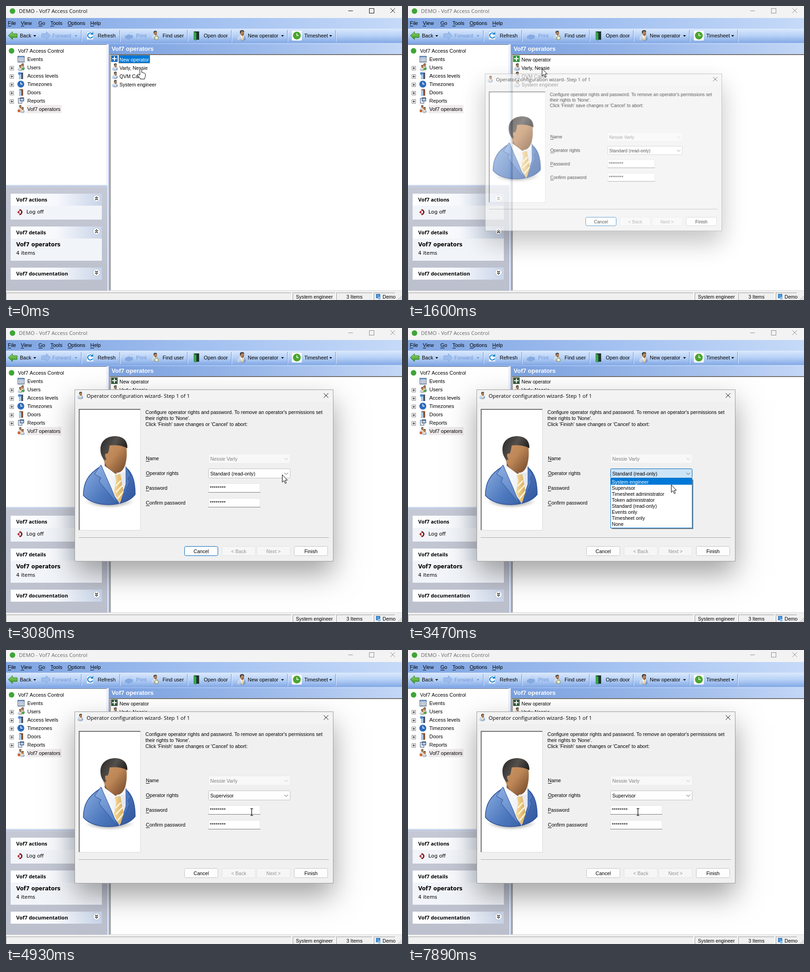
An HTML page with a canvas for the animation above (8 s loop, 855 px wide and 636 px high).

```html
<!DOCTYPE html>
<html lang="en">
<head>
<meta charset="utf-8">
<title>Operator rights</title>
<style>
html, body { margin: 0; width: 100%; height: 100%; overflow: hidden; }
canvas { display: block; }
</style>
</head>
<body>
<canvas id="stage" width="855" height="636"></canvas>
<script>
const LOOP = 8000, STEP = 1000 / 15;
const screen2d = document.getElementById('stage').getContext('2d');
const layer = Object.assign(document.createElement('canvas'), { width: 855, height: 636 });
const layer2d = layer.getContext('2d');
let g = screen2d;

const SANS = '"Liberation Sans", Arial, sans-serif';
const UI = '11px ' + SANS, SMALL = '10.6px ' + SANS, HEAD = 'bold 13px ' + SANS;
const TITLE = '11.4px "Open Sans", sans-serif', CARD = 'bold 11px "Open Sans", sans-serif';
const WIDE = '11px "DejaVu Sans", sans-serif', WIDE_BOLD = 'bold 11.4px "DejaVu Sans", sans-serif';

const PRODUCT = 'Vof7';
const RIGHTS = ['System engineer', 'Supervisor', 'Timesheet administrator', 'Token administrator',
  'Standard (read-only)', 'Events only', 'Timesheet only', 'None'];

// drawing helpers
const rect = (x, y, w, h, c) => { g.fillStyle = c; g.fillRect(x, y, w, h); };
const frame = (x, y, w, h, c) => { g.strokeStyle = c; g.lineWidth = 1; g.strokeRect(x + .5, y + .5, w - 1, h - 1); };
function path(d, fill, stroke, width = 1) {
  const p = new Path2D(d);
  if (fill) { g.fillStyle = fill; g.fill(p); }
  if (stroke) { g.strokeStyle = stroke; g.lineWidth = width; g.stroke(p); }
}
function disc(x, y, r, fill, stroke, width = 1) {
  g.beginPath(); g.arc(x, y, r, 0, 7);
  if (fill) { g.fillStyle = fill; g.fill(); }
  if (stroke) { g.strokeStyle = stroke; g.lineWidth = width; g.stroke(); }
}
function box(x, y, w, h, r, fill, stroke) {
  g.beginPath(); g.roundRect(x + .5, y + .5, w - 1, h - 1, r);
  g.fillStyle = fill; g.fill();
  g.strokeStyle = stroke; g.lineWidth = 1; g.stroke();
}
function at(x, y, scale, draw) {
  g.save(); g.translate(x, y); g.scale(scale, scale); draw(); g.restore();
}
function grad(x0, y0, x1, y1, ...colors) {
  const q = g.createLinearGradient(x0, y0, x1, y1);
  colors.forEach((c, i) => q.addColorStop(i / (colors.length - 1), c));
  return q;
}
function text(s, x, y, font = UI, color = '#000', align = 'left') {
  g.font = font; g.fillStyle = color; g.textAlign = align; g.fillText(s, x, y);
}
function mnemonic(s, x, y, font) {
  text(s, x, y, font);
  rect(x, y + 2, Math.round(g.measureText(s[0]).width), 1, '#000');
}
const clamp = v => Math.max(0, Math.min(1, v));
const ramp = (t, a, b) => clamp((t - a) / (b - a));
const mix = (a, b, k) => `rgb(${a.map((v, i) => Math.round(v + (b[i] - v) * k))})`;

// 112 x 150 bust without facial features; suit is [light, middle, dark]
function avatar([light, middle, dark]) {
  path('M0 128C0 100 10 82 38 65L84 62C104 74 112 92 112 126C92 154 22 156 0 128Z',
    grad(0, 60, 112, 150, light, middle, dark), dark, 1.5);
  path('M38 58L92 60L97 88L78 144L58 118Z', grad(38, 0, 97, 0, '#ffffff', '#dfe4ee'));
  path('M68 84L80 82L82 94L88 128L78 146L66 122L71 96Z', grad(66, 0, 88, 0, '#f8dc9c', '#d3a758'));
  path('M70 108L81 96M70 122L85 106M74 135L87 119', null, '#fff4d4', 3);
  path('M38 62L24 82L38 90L34 98L74 147L60 112Z', grad(24, 60, 74, 147, light, middle), dark);
  path('M92 66L102 84L96 92L100 98L80 146L92 104Z', middle, dark);
  path('M46 46L40 64L64 88L72 80L90 78L86 56Z', '#f7f9fc');
  path('M46 46L46 64L70 82L84 66Z', '#8a5a36');
  path('M44 24C48 6 88 6 93 24C96 50 90 78 74 79C58 78 46 62 42 46Z',
    grad(44, 20, 94, 60, '#c99464', '#bd8656', '#835634'));
  path('M37 30C36 8 54 0 68 0C86 0 96 10 95 26C82 19 68 19 57 20C55 30 55 38 50 38C46 36 46 44 50 50L46 52C40 46 37 38 37 30Z',
    grad(40, 0, 95, 30, '#2a2927', '#55504c', '#1b1917'));
}
const BLUE_SUIT = ['#8fb0e2', '#4f7abf', '#2d5299'];
const PALE_SUIT = ['#f0f4fa', '#b4c6e2', '#5b7cb4'];
const person = (x, y, h) => at(x - h * .373, y - h / 2, h / 150, () => avatar(PALE_SUIT));

function bigArrow(x, fill, edge, flip) {
  g.save(); g.translate(x, 64); if (flip) g.scale(-1, 1);
  path('M-10 0L-1 -8.5V-4H9V4H-1V8.5Z', fill, edge);
  g.restore();
}
const dropMark = (x, c = '#000') => path(`M${x - 3} 63h6l-3 3.5Z`, c);
const chevron = (x, y, c) => path(`M${x - 4} ${y - 2}l4 4l4 -4`, null, c);
const cross = (x, y, c) => path(`M${x - 5} ${y - 5}l10 10m0 -10l-10 10`, null, c);
function clock(x, y, r, face) {
  disc(x, y, r, face);
  path(`M${x} ${y - r * .6}V${y}H${x + r * .5}`, null, '#fff', 1.5);
}
function door(x, y, c) {
  rect(x - 4, y - 7, 9, 14, c);
  path(`M${x - 4} ${y - 7}l5 3v12l-5 -2Z`, '#a8c8e8');
}

function titleBar(active) {
  rect(0, 0, 855, 26, '#f3f3f3');
  const c = active ? '#111' : '#8c8c8c';
  disc(14, 11, 6, '#3fa535');
  text(`DEMO - ${PRODUCT} Access Control`, 28, 15, TITLE, active ? '#111' : '#666');
  rect(739, 10, 10, 1, c);
  frame(784, 5, 11, 11, c);
  cross(835, 10, c);
}

function toolbars() {
  rect(0, 26, 855, 57, grad(0, 0, 855, 0, '#7ea4e2', '#a2c0f0', '#c6daf8'));
  [['File', 4], ['View', 32], ['Go', 70], ['Tools', 96], ['Options', 133], ['Help', 182]]
    .forEach(([s, x]) => mnemonic(s, x, 41));
  rect(0, 49, 855, 31, grad(0, 49, 0, 80, '#dbe9fd', '#b6d0f6', '#82a8e5'));
  [162, 245, 391, 486, 607, 711].forEach(x => { rect(x, 52, 1, 25, '#6a8ccb'); rect(x + 1, 53, 1, 25, '#f1f6ff'); });
  bigArrow(15, grad(0, -8, 0, 8, '#9bd96b', '#2f9423'), '#2b7b22');
  bigArrow(86, '#9dbdec', '#83a8df', true);
  rect(174, 55, 15, 18, '#fafcff'); frame(174, 55, 15, 18, '#b3c6e4');
  path('M186 60A5.5 5.5 0 1 0 187 66', null, '#1683d2', 2.2);
  path('M188 56v6h-6Z', '#1683d2');
  path('M257 65l10 -5l7 4v5l-9 4l-8 -3Z', '#86a9e0');
  path('M263 61l4 -6l7 1l-3 7Z', '#c1d5f4');
  person(321, 63, 19); disc(325, 69, 4, '#e9edc9', '#7f8640');
  rect(405, 55, 12, 18, '#223333'); path('M405 55l6 3v17l-6 -2Z', '#35a44b');
  person(508, 64, 24);
  box(617, 53, 22, 22, 2, '#fff', '#e4ecf8'); clock(628, 64, 8.5, '#4aa52e');
  [['Back', 30], ['Refresh', 198], ['Find user', 338], ['Open door', 427], ['New operator', 522], ['Timesheet', 644]]
    .forEach(([s, x]) => text(s, x, 68));
  [['Forward', 100], ['Print', 281]].forEach(([s, x]) => text(s, x, 68, UI, '#6f93d3'));
  [62, 597, 701].forEach(x => dropMark(x));
  dropMark(151, '#6f93d3');
}

function tree() {
  rect(0, 83, 219, 304, '#fff');
  rect(0, 83, 218, 1, '#6b7890'); rect(217, 83, 1, 303, '#dfe3ea');
  disc(12, 97, 6, '#3fa535');
  text(`${PRODUCT} Access Control`, 26, 101);
  rect(44, 214, 76, 18, '#f0ecee');
  ['Events', 'Users', 'Access levels', 'Timezones', 'Doors', 'Reports', `${PRODUCT} operators`]
    .forEach((s, i) => {
      const y = 115 + 18 * i;
      text(s, 46, y + 4);
      if (i < 1 || i > 5) return;
      rect(8, y - 3, 9, 9, '#fff'); frame(8, y - 3, 9, 9, '#848484');
      rect(10, y + 1, 5, 1, '#000'); rect(12, y - 1, 1, 5, '#000');
    });
  rect(25, 108, 15, 14, '#fff'); frame(25, 108, 15, 14, '#4b5b75'); rect(26, 109, 13, 3, '#7aa4dd');
  for (let i = 0; i < 9; i++) rect(27 + i % 3 * 4, 113 + (i / 3 | 0) * 3, 3, 2, '#8494b0');
  person(35, 131, 14); person(30, 134, 13); disc(37, 136, 3, '#55a548');
  door(32, 151, '#4d5666'); disc(29, 146, 3, '#4b8ad8');
  clock(32, 169, 7.5, '#2e6cbb');
  door(32, 187, '#8a5230');
  rect(26, 199, 9, 12, '#dfe7f3'); frame(26, 199, 9, 12, '#54637c');
  rect(30, 198, 9, 8, '#33435e'); rect(31, 200, 7, 5, '#aac6ea');
  person(30, 221, 13); person(35, 225, 13); disc(28, 227, 3, '#d0662e');
}

function card(y, title, bodyHeight, up) {
  rect(10, y, 197, 26, grad(10, 0, 207, 0, '#fff', '#f6f8fc', '#c8d4e8'));
  if (bodyHeight) rect(10, y + 26, 197, bodyHeight, '#f1f4f9');
  text(title, 22, y + 17, CARD);
  disc(195.5, y + 10.5, 7.5, '#fff', '#aab8d2');
  const d = up ? -3 : 3, top = y + (up ? 10 : 7);
  [0, 4].forEach(k => path(`M192.5 ${top + k}l3 ${d}l3 ${-d}`, null, '#111', 1.3));
}

function sidePanel() {
  rect(0, 386, 223, 5, '#e9edf5'); rect(0, 389, 219, 1, '#7d9cd3');
  rect(0, 391, 219, 227, grad(0, 391, 0, 618, '#c5c9d5', '#bcc0cd'));
  card(406, `${PRODUCT} actions`, 30, true);
  path('M29 441A5 5 0 0 1 29 451', null, '#7d1a20', 3);
  path('M24 446l5 -4v8Z', '#b53238');
  text('Log off', 44, 449, WIDE);
  card(477, `${PRODUCT} details`, 48, true);
  text(`${PRODUCT} operators`, 22, 520, WIDE_BOLD);
  text('4 items', 22, 538, WIDE);
  card(566, `${PRODUCT} documentation`, 0, false);
}

function plusIcon(c) {
  rect(227, 107, 14, 14, c);
  rect(229, 113, 10, 2, '#fff'); rect(233, 109, 2, 10, '#fff');
}

function operatorList(t) {
  rect(219, 83, 4, 535, '#e6ecf7'); rect(222, 83, 1, 535, '#7899d4');
  rect(223, 83, 632, 21, grad(223, 0, 855, 0, '#7ba1e0', '#9bb9eb', '#c3d7f6'));
  text(`${PRODUCT} operators`, 228, 97, HEAD, '#fff');
  rect(223, 104, 632, 512, '#fff');
  rect(223, 104, 632, 1, '#8a8a8a'); rect(225, 105, 630, 1, '#555');
  rect(223, 104, 1, 512, '#8a8a8a'); rect(225, 105, 1, 510, '#555');
  rect(223, 615, 632, 1, '#d9d9d9');
  const selected = t < 990 ? 0 : t < 1520 ? 1 : -1;
  plusIcon(t < 990 ? '#1b6fc4' : t < 1860 ? '#2f9a3c' : '#385b3d');
  ['New operator', 'Varly, Nessie', 'QVM Caller', 'System engineer'].forEach((s, i) => {
    const y = 115 + 18 * i;
    if (i) person(235, y - 1, 16);
    if (i === selected) {
      rect(243, y - 9, 68, 18, '#0078d7');
      g.setLineDash([1, 1]); frame(243, y - 9, 68, 18, '#f0a050'); g.setLineDash([]);
    }
    text(s, 245, y + 5, SMALL, i === selected ? '#fff' : '#000');
  });
}

function statusBar() {
  rect(0, 616, 855, 20, '#f0f0f0');
  [[0, 616], [619, 711], [713, 791], [794, 840]].forEach(([a, b]) => {
    rect(a, 620, b - a, 1, '#a0a0a0'); rect(a, 620, 1, 16, '#a0a0a0'); rect(b, 620, 1, 16, '#fff');
  });
  text('System engineer', 626, 633, SMALL);
  text('3 Items', 735, 633, SMALL);
  rect(799, 623, 9, 9, '#4a9be0'); frame(799, 623, 9, 9, '#2561a5'); disc(806, 632, 3, '#8fc2ea');
  text('Demo', 813, 633, SMALL);
  for (let i = 0; i < 3; i++) path(`M${846 + i * 4} 636l${9 - i * 4} ${i * 4 - 9}`, null, '#a5a5a5');
}

function button(s, x, fill, edge, color = '#000') {
  box(x, 472, 73, 21, 3, fill, edge);
  text(s, x + 36.5, 487, SMALL, color, 'center');
}

function combo(y, value, fill, edge, color) {
  box(437, y, 177, 21, 2, fill, edge);
  text(value, 441, y + 15, SMALL, color);
  chevron(605, y + 11, color === '#000' ? '#555' : '#bbb');
}

function dialog(t) {
  g.save();
  g.shadowColor = 'rgba(0,0,0,.36)'; g.shadowBlur = 56; g.shadowOffsetY = 27;
  rect(148, 133, 559, 372, '#f0f0f0');
  g.restore();
  rect(149, 134, 557, 26, '#f3f3f3');
  frame(148, 133, 559, 372, '#9b9b9b');
  person(160, 146, 16);
  text('Operator configuration wizard- Step 1 of 1', 174, 151, TITLE);
  cross(691, 146, '#111');

  rect(157, 175, 134, 263, '#fff');
  frame(157, 175, 134, 263, '#d8d8d8');
  rect(157, 175, 133, 2, '#707070'); rect(157, 175, 2, 262, '#707070');
  g.save();
  g.filter = 'blur(3px)';
  path('M172 374Q223 396 276 374Q223 382 172 374Z', '#999');
  g.restore();
  at(167, 234, 1, () => avatar(BLUE_SUIT));

  ["Configure operator rights and password. To remove an operator's permissions set",
    "their rights to 'None'.", "Click 'Finish' save changes or 'Cancel' to abort:"]
    .forEach((s, i) => text(s, 301, 186 + 13 * i, SMALL));
  ['Name', 'Operator rights', 'Password', 'Confirm password']
    .forEach((s, i) => mnemonic(s, 302, 286 + 32 * i, SMALL));

  const open = t >= 3200 && t < 4270;
  const heat = open ? 1 : t > 4000 ? 1 - ramp(t, 4270, 4530) : 0;
  combo(272, 'Nessie Varly', '#f8f8f8', '#ececec', '#808080');
  combo(304, t < 4270 ? RIGHTS[4] : RIGHTS[1], mix([255, 255, 255], [204, 228, 247], heat),
    mix([190, 190, 190], [0, 103, 184], heat), '#000');
  [336, 368].forEach(y => {
    rect(437, y, 112, 20, '#fff'); frame(437, y, 112, 20, '#e4e4e4');
    rect(437, y + 19, 112, 1, '#777');
    text('********', 440, y + 14, UI);
  });

  rect(157, 453, 540, 1, '#a0a0a0'); rect(157, 454, 540, 1, '#fff');
  button('Cancel', 385, '#fdfdfd', t < 3200 ? '#0067b8' : '#c4c4c4');
  button('< Back', 466, '#f6f6f6', '#e3e3e3', '#929292');
  button('Next >', 541, '#f6f6f6', '#e3e3e3', '#929292');
  const hover = ramp(t, 6540, 6700) * (1 - ramp(t, 7240, 7380));
  button('Finish', 622, mix([253, 253, 253], [224, 238, 249], hover), mix([196, 196, 196], [0, 120, 212], hover));
  if (open) dropList(t);
}

function dropList(t) {
  const h = 108 * ramp(t, 3180, 3390), y0 = 325;
  const row = t < 3455 ? 4 : Math.floor((cursorAt(t)[1] - 326.5) / 13);
  g.save();
  g.beginPath(); g.rect(437, y0, 182, h + 3); g.clip();
  rect(440, y0 + 3, 176, h - 1, 'rgba(0,0,0,.45)');
  rect(437, y0, 177, h, '#fff');
  RIGHTS.forEach((s, i) => {
    const y = y0 + 1 + 13 * i + h - 108;
    if (i === row) rect(438, y, 175, 13, '#0078d7');
    text(s, 440, y + 11, SMALL, i === row ? '#fff' : '#000');
  });
  frame(437, y0, 177, h, '#0078d7');
  g.restore();
}

// pointer route: time, x, y
const ROUTE = [[0, 289, 135], [2267, 289, 135], [2333, 352, 198], [2400, 510, 290], [2467, 643, 369],
  [2600, 643, 369], [2900, 600, 318], [3200, 592, 316], [3400, 588, 320], [3467, 568, 339],
  [3667, 561, 354], [3800, 561, 354], [3933, 561, 348], [4267, 561, 348], [4533, 561, 341], [4600, 561, 341],
  [4933, 530, 350], [5733, 530, 350], [5933, 512, 352], [6267, 723, 507], [6533, 681, 482],
  [7200, 681, 482], [7600, 540, 379], [7733, 540, 379], [7866, 496, 350], [8100, 496, 350]];

function cursorAt(time) {
  const t = Math.floor((time + 11) / STEP) * STEP + .5;
  const i = ROUTE.findIndex(k => k[0] > t);
  const [t0, x0, y0] = ROUTE[i - 1], [t1, x1, y1] = ROUTE[i];
  const k = (t - t0) / (t1 - t0);
  return [Math.round(x0 + (x1 - x0) * k), Math.round(y0 + (y1 - y0) * k)];
}

function cursor(t) {
  const [x, y] = cursorAt(t);
  const inField = (t < 3200 || t >= 4270) && x > 437 && x < 549 && (y > 335 && y < 356 || y > 367 && y < 388);
  g.lineJoin = 'round';
  if (t < 460) at(x - 6, y, 1, () => path('M6 14V3C6 0 10 0 10 3V9C12 8 13 8.5 13.5 10C15 9.5 16 10 16.3 11C18 11 18 12 18 13V17C18 19 16 20 16 23H7C7 20 2 17 1 14C1 12 3 12 4 13L6 15Z', '#fff', '#000'));
  else if (inField) at(x + .5, y + .5, 1, () => path('M-3 -7.5H-1L0 -6.5L1 -7.5H3M0 -7V7M-3 7.5H-1L0 6.5L1 7.5H3', null, '#000', 1.2));
  else at(x + .5, y + .5, 1, () => path('M0 0V16L3.7 12.6L6.3 18.6L8.8 17.6L6.3 11.6H11Z', '#fff', '#000'));
  g.lineJoin = 'miter';
}

// dialog opening: start time, opacity, scale
const OPENING = [[1520, .25, .9], [1600, .66, .915], [1720, .9, .97], [1790, .97, .99]];

function render(t) {
  titleBar(t < 1520);
  toolbars();
  tree();
  sidePanel();
  operatorList(t);
  statusBar();
  if (t >= 1860) dialog(t);
  else if (t >= 1520) {
    const [, alpha, scale] = OPENING.filter(s => s[0] <= t).pop();
    g = layer2d; g.clearRect(0, 0, 855, 636); dialog(t); g = screen2d;
    g.save();
    g.globalAlpha = alpha;
    g.translate(363, 290); g.scale(scale, scale); g.translate(-363, -290);
    g.drawImage(layer, 0, 0);
    g.restore();
  }
  cursor(t);
}

const start = performance.now();
function tick() {
  render((performance.now() - start) % LOOP);
  requestAnimationFrame(tick);
}
tick();
</script>
</body>
</html>
```
